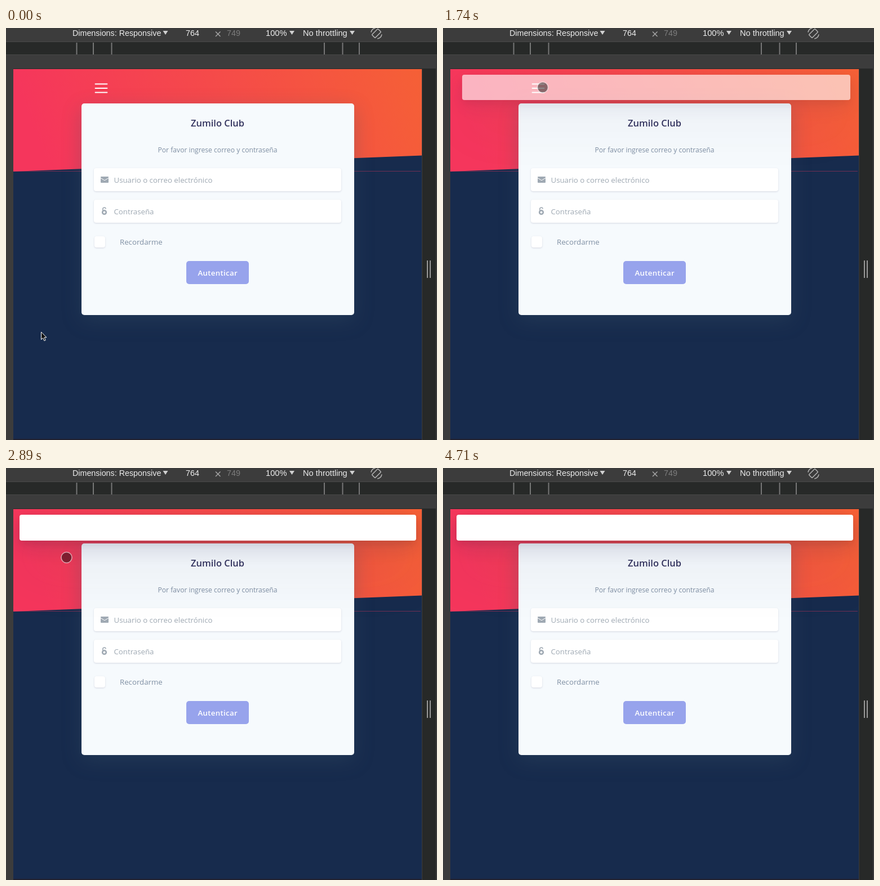
An HTML page that plays this animation: 765x732 px, repeating every 5580 ms.

```html
<!DOCTYPE html>
<html lang="es">
<head>
<meta charset="utf-8">
<title>Login</title>
<style>
  html, body { margin: 0; width: 100%; height: 100%; overflow: hidden; background: #3c3c3c; }
  svg, div { position: absolute; }
  svg { left: 0; top: 0; width: 765px; height: 732px; }
  text { font: 13.25px "Open Sans", sans-serif; }
  .bar text { font: 14.3px "Liberation Sans", Arial, sans-serif; fill: #ececec; }
  .view { inset: 0; width: 765px; height: 732px; clip-path: inset(73px 27px 0 13px); }
  .card {
    left: 134px; top: 134px; width: 484px; height: 375.5px; border-radius: 5px; background: #f6fafd;
    box-shadow: 0 10px 35px rgba(60,85,105,.3);
  }
  .field {
    left: 156px; width: 439px; height: 41px; border-radius: 4px; background: #fff;
    box-shadow: 0 1px 3px rgba(50,50,93,.15), 0 1px 0 rgba(0,0,0,.02);
  }
  .check { top: 370px; left: 157px; width: 19px; height: 20px; }
  .button { left: 320px; top: 414px; width: 111px; height: 41px; border-radius: 5px; background: #97a3ec; }
  #menu {
    left: 24px; top: 83px; width: 704px; height: 46px; border-radius: 4px; background: #fff;
    transform-origin: 66.6% 0;
    box-shadow: 0 50px 100px rgba(50,50,93,.1), 0 15px 35px rgba(50,50,93,.15), 0 5px 15px rgba(0,0,0,.1);
  }
</style>
</head>
<body>
<svg class="bar" viewBox="0 0 765 732">
  <rect y="25" width="765" height="22" fill="#272928"/>
  <rect x="739" y="72" width="24" height="660" fill="#272928"/>
  <path stroke="#484848" d="M0 24.5H765M0 47.5H765"/>
  <path stroke="#2b2b2b" d="M13 72.5H739"/>
  <path id="ticks" stroke="#777" stroke-width="2"/>
  <path stroke="#999" stroke-width="2" d="M748 413v31m5 0v-31"/>
  <text x="118" y="14">Dimensions: Responsive</text>
  <text x="319" y="14">764</text>
  <text x="392" y="14" style="fill:#7d7d7d">749</text>
  <text x="461" y="14" style="font-size:14.7px">100%</text>
  <text x="527" y="14" style="font-size:14.6px">No throttling</text>
  <path id="carets" fill="#d0d0d0"/>
  <path stroke="#aaa" stroke-width="1.4" d="M372 6.5l8.5 8.5m0-8.5l-8.5 8.5"/>
  <g transform="translate(657.5 9.5) rotate(45)" fill="none" stroke="#b5b5b5" stroke-width="1.5">
    <rect x="-4" y="-7.5" width="8" height="15" rx="1"/>
    <path d="M-8 -5.5A9.7 9.7 0 0 0 -8 5.5M8 -5.5A9.7 9.7 0 0 1 8 5.5"/>
  </g>
</svg>

<div class="view">
  <svg viewBox="0 0 765 732">
    <linearGradient id="warm" x1="0" y1=".1" x2="1" y2="0">
      <stop stop-color="#f5365c"/><stop offset="1" stop-color="#f56036"/>
    </linearGradient>
    <rect width="765" height="732" fill="#172b4d"/>
    <path fill="url(#warm)" d="M13 73H739V226.5L13 255Z"/>
    <path stroke="#f5365c" stroke-opacity=".4" d="M13 254.5H736"/>
    <path stroke="#21202f" stroke-width="2" d="M13 731H739"/>
    <path id="burger" stroke="#fff" stroke-width="1.8" stroke-linecap="round"/>
  </svg>
  <div class="card"></div>
  <div class="field" style="top:249px"></div>
  <div class="field" style="top:305px"></div>
  <div class="field check"></div>
  <div class="button"></div>
  <svg viewBox="0 0 765 732" fill="#7f8fa3">
    <g text-anchor="middle">
      <text x="375.5" y="174.5" fill="#32325d" style="font-size:16.5px;font-weight:600">Zumilo Club</text>
      <text x="375.5" y="220.5" style="font-size:12.15px">Por favor ingrese correo y contraseña</text>
      <text x="375.7" y="439.5" fill="#fff" style="font-weight:600;letter-spacing:.025em">Autenticar</text>
    </g>
    <text x="202" y="385">Recordarme</text>
    <g fill="#9fa9b3">
      <text x="191.5" y="274.5">Usuario o correo electrónico</text>
      <text x="191.5" y="330.5">Contraseña</text>
      <rect x="168" y="264" width="14" height="11" rx="1"/>
      <path fill="none" stroke="#fff" d="M168 266.5l7 4.3l7-4.3"/>
      <circle cx="174.5" cy="327.5" r="3.3" fill="none" stroke="#9fa9b3" stroke-width="2.6"/>
      <path fill="none" stroke="#9fa9b3" stroke-width="1.5" d="M171.8 325v-3a2.7 2.7 0 0 1 5.4-.6"/>
    </g>
  </svg>
  <div id="menu"></div>
</div>

<svg viewBox="0 0 765 732">
  <path id="arrow" d="M62.5 540v13.5l3.1-2.8l2.3 5l2.3-1l-2.2-4.9h4z" fill="#111" stroke="#fff"/>
  <circle id="touch" r="9.5" fill="#000" fill-opacity=".45" stroke="#fff" stroke-opacity=".55" stroke-width="1.6"/>
</svg>

<script>
const LOOP = 5580, TOUCH_START = 530, TOUCH_END = 4705, MENU_START = 1740;
const get = id => document.getElementById(id);
const menu = get('menu'), arrow = get('arrow'), touch = get('touch');
const show = (el, on) => { el.style.visibility = on ? 'visible' : 'hidden'; };
const trace = (id, values, shape) => get(id).setAttribute('d', values.map(shape).join(''));

// Ruler ticks mirror around the middle of the page
trace('ticks', [125.5, 155, 187.5], x => `M${x} 26v21M${752.5 - x} 26v21`);
trace('carets', [278.5, 503, 610], x => `M${x} 5h9l-4.5 7z`);
trace('burger', [99.5, 107, 114.5], y => `M158.5 ${y}h21`);

const easeIn = u => u * u;
const easeOut = u => u * (2 - u);
const smooth = u => u * u * (3 - 2 * u);
const progress = (t, from, to) => Math.min(1, Math.max(0, (t - from) / (to - from)));

const origin = { x: 64, y: 546 };
const moves = [
  { from: TOUCH_START, to: 800, x: 190, y: 88, ease: smooth },
  { from: 980, to: 1210, x: 177, y: 105.5, ease: smooth },
  { from: 2345, to: 2890, x: 107.5, y: 159, ease: easeOut },
  { from: 3260, to: 3430, x: 125.5, y: 91, ease: easeOut },
  { from: 3610, to: 4240, x: 107, y: 163, ease: smooth },
  { from: 4490, to: TOUCH_END, x: 375, y: 675, ease: easeIn }
];

function pointAt(t) {
  let { x, y } = origin;
  for (const move of moves) {
    const k = move.ease(progress(t, move.from, move.to));
    x += (move.x - x) * k;
    y += (move.y - y) * k;
  }
  return [x, y];
}

function draw(now) {
  const t = now % LOOP;
  show(arrow, t < TOUCH_START);
  show(touch, t >= TOUCH_START && t < TOUCH_END);
  touch.setAttribute('transform', `translate(${pointAt(t)})`);

  const remaining = 1 - progress(t, MENU_START, MENU_START + 170);
  show(menu, t >= MENU_START);
  menu.style.opacity = 1 - 0.38 * remaining;
  menu.style.transform = `scale(${1 - 0.0213 * remaining})`;
  requestAnimationFrame(draw);
}
draw(performance.now());
</script>
</body>
</html>
```
